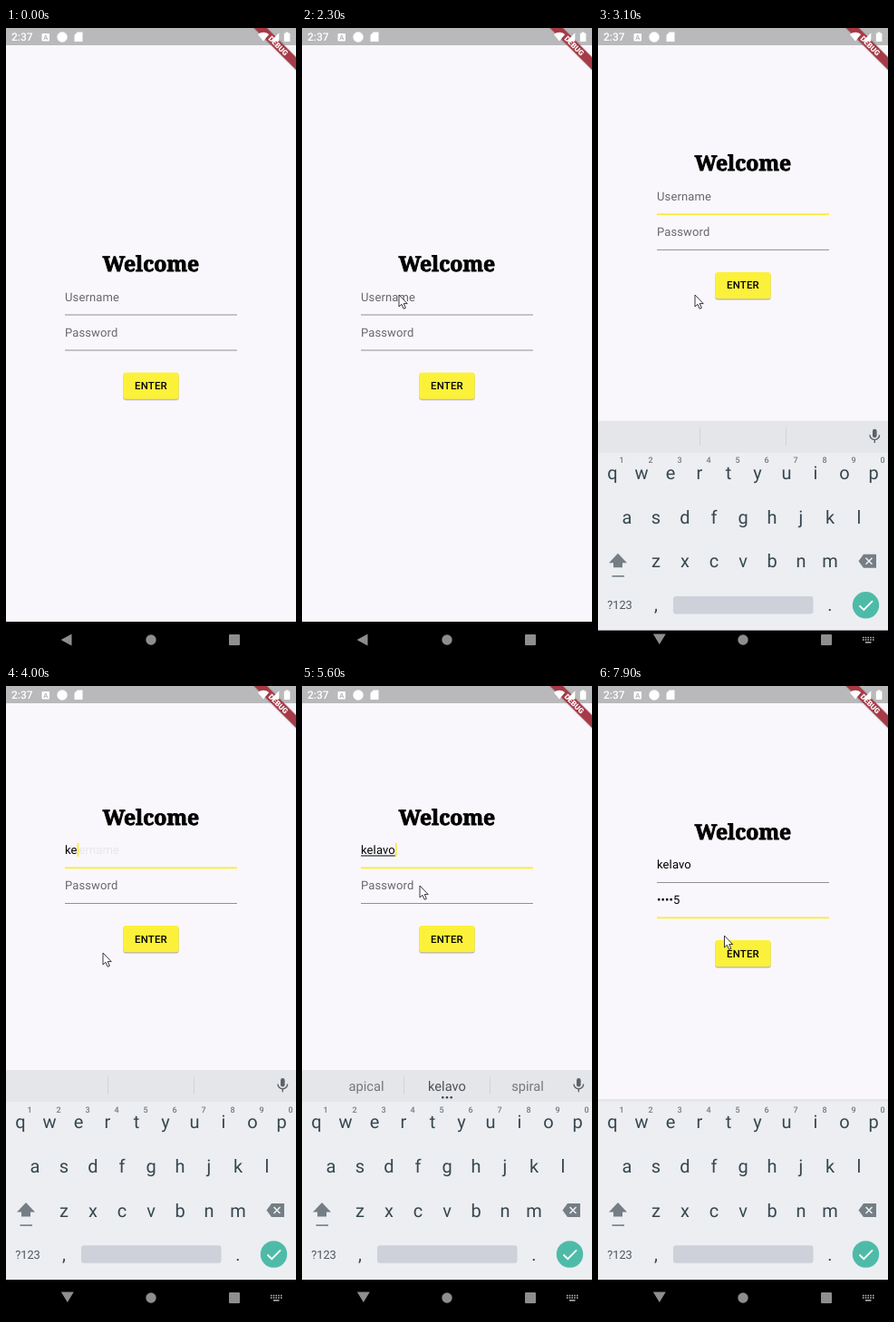
An HTML page that plays this animation: 320 by 694 pixels, repeating every 8 s.

```html
<!DOCTYPE html>
<html lang="en">
<head>
<meta charset="utf-8">
<title>Welcome form</title>
<style>
html, body { margin: 0; width: 100%; height: 100%; overflow: hidden; background: #f9f7fb; }
svg { display: block; width: 320px; height: 694px; font-family: Roboto, sans-serif; }
text { text-rendering: geometricPrecision; white-space: pre; }
.mid { text-anchor: middle; }
.field { font-size: 13px; letter-spacing: .12px; }
.hint { fill: #69676b; }
.key { font-size: 20px; fill: #37474f; }
.digit { font-size: 9px; font-weight: 500; fill: #74797e; }
.word { font-size: 14.7px; fill: #74777b; }
</style>
</head>
<body>
<svg viewBox="0 0 320 694">
  <rect width="320" height="694" fill="#f9f7fb"/>

  <g id="form">
    <text class="mid" x="160" y="268" font-family="Noto Serif, serif" font-weight="900" font-size="23"
      stroke="#000" stroke-width=".9" stroke-linejoin="round">Welcome</text>
    <text id="userHint" class="field hint" x="65" y="300.5">Username</text>
    <text id="user" class="field" x="65" y="300.5"></text>
    <rect id="compose" x="65" y="302" height="1"/>
    <rect id="userLine" x="65" width="190"/>
    <text id="passHint" class="field hint" x="65" y="339.5">Password</text>
    <text id="pass" class="field" x="65" y="339.5"></text>
    <rect id="passLine" x="65" width="190"/>
    <rect id="caret" width="1.7" height="15" fill="#f8ed32"/>
    <rect x="129" y="380.5" width="62" height="30" rx="3.5" fill="#000" opacity=".1"/>
    <rect x="129.5" y="380.5" width="61" height="29.3" rx="3" fill="#000" opacity=".2"/>
    <rect x="129.3" y="379.5" width="61.4" height="29.3" rx="3" fill="#fcf13a"/>
    <text class="mid" x="160" y="398" font-size="11.4" font-weight="500" letter-spacing=".2">ENTER</text>
  </g>

  <rect width="320" height="19" fill="#b9b8ba"/>
  <g transform="translate(320) rotate(45)">
    <rect x="-50" y="22" width="100" height="11.6" fill="#000" opacity=".15"/>
    <rect x="-50" y="22.8" width="100" height="9.8" fill="#a63b47"/>
    <text class="mid" y="30.7" font-size="8.3" font-weight="900" fill="#fff">DEBUG</text>
  </g>
  <g fill="#fff">
    <text x="6" y="14.2" font-size="12" font-weight="500">2:37</text>
    <rect x="39.5" y="6" width="8.5" height="8.5" rx="1"/>
    <text class="mid" x="43.75" y="13" font-size="7.5" font-weight="700" style="fill:#b9b8ba">A</text>
    <circle cx="62" cy="10" r="5.7"/>
    <path d="M78.8 4.5H84.5V15H75.5V7.8Z"/>
    <path d="M277.8 7Q284 2.6 290.2 7L284 14.6Z"/>
    <path d="M292 14.7H301.3V5.2Z"/>
    <path d="M308.6 4.5H311.6V5.7H313.4V15H306.8V5.7H308.6Z"/>
  </g>

  <rect y="654" width="320" height="40"/>
  <g id="keyboard">
    <rect id="panel" width="320" fill="#eceef2"/>
    <g id="strip">
      <rect y="423" width="320" height="34" fill="#e4e6ea"/>
      <path d="M112.5 430V450M207.5 430V450" stroke="#d1d4d8"/>
      <text id="left" class="word mid" x="71" y="445.5">apical</text>
      <text id="middle" class="word mid" x="160" y="445.5" style="fill:#4d5256"></text>
      <text id="right" class="word mid" x="249" y="445.5">spiral</text>
      <g id="dots" fill="#37474f">
        <circle cx="155.3" cy="453.3" r="1.3"/><circle cx="160" cy="453.3" r="1.3"/><circle cx="164.7" cy="453.3" r="1.3"/>
      </g>
      <rect x="303" y="432" width="4.6" height="9.5" rx="2.3" fill="#5a6268"/>
      <path d="M300 438.5a5.3 5.3 0 0 0 10.6 0M305.3 444V447.3" fill="none" stroke="#5a6268" stroke-width="1.4"/>
    </g>
    <rect id="edge" y="455" width="320" height="3" fill="#e4e6ea"/>
    <g id="keys"></g>
    <path d="M22 569L32 579.5H27V584.5H17V579.5H12Z" fill="#747e84"/>
    <rect x="15.5" y="593.3" width="13.5" height="1.6" fill="#747e84"/>
    <path d="M293 570H307V585H293L287.5 577.5Z" fill="#747e84"/>
    <path d="M295.5 574L302.5 581M302.5 574L295.5 581" stroke="#eceef2" stroke-width="1.6"/>
    <text class="mid" x="24" y="630.5" font-size="12.8" fill="#4d565c">?123</text>
    <rect x="83" y="616.3" width="154.5" height="19.5" rx="3" fill="#ced1d9"/>
    <circle cx="295.5" cy="626" r="14.7" fill="#4ebba8"/>
    <path d="M288.5 626.5L293.3 631.2L303 621.4" fill="none" stroke="#fff" stroke-width="1.8"/>
    <rect y="654" width="320" height="60"/>
  </g>

  <g fill="#8e8e8e">
    <path id="back" d="M60.5 674L72.5 667.5V680.5Z"/>
    <g id="kbNav">
      <path d="M60.8 667.5H74.8L67.8 679Z"/>
      <path d="M292 671.5H304.5M292 674H304.5" stroke="#c4c4c4" stroke-width="1.4" stroke-dasharray="1.5 1.25"/>
      <path d="M295 676.8H301.5" stroke="#c4c4c4" stroke-width="1.4"/>
    </g>
    <circle cx="160" cy="674" r="5.7"/>
    <rect x="246" y="668" width="12" height="12" rx="1"/>
  </g>

  <path id="pointer" d="M0 0V13L3 10.3L5.2 15.3L7.4 14.3L5.2 9.6H9.2Z" fill="#fff" stroke="#222" stroke-width=".9"/>
</svg>

<script>
const $ = id => document.getElementById(id);
const LOOP = 8000, TAP_USER = 2850, KB_IN = 2980, TAP_PASS = 5800;
const NAME = 'kelavo', PIN = '12345';
const nameTimes = [3850, 3980, 4300, 4600, 4900, 5150];
const pinTimes = [6500, 6700, 6900, 7150, 7370];
// time, x, y
const path = [[1300, 77, 418], [1800, 107, 294], [5200, 107, 294], [5520, 130, 220],
  [7420, 130, 220], [7800, 139.5, 275]];

const show = (id, on) => $(id).setAttribute('visibility', on ? 'visible' : 'hidden');
const set = (id, attrs) => { for (const k in attrs) $(id).setAttribute(k, attrs[k]); };
const clamp = v => Math.min(1, Math.max(0, v));
const typed = (times, t) => times.filter(s => s <= t).length;

function addText(cls, x, y, s) {
  const el = document.createElementNS('http://www.w3.org/2000/svg', 'text');
  el.setAttribute('class', cls + ' mid');
  el.setAttribute('x', x);
  el.setAttribute('y', y);
  el.textContent = s;
  $('keys').append(el);
}
[['qwertyuiop', 16, 487], ['asdfghjkl', 32, 536], ['zxcvbnm', 64, 584.5]].forEach(([row, x, y]) =>
  [...row].forEach((c, i) => addText('key', x + 32 * i, y, c)));
[...'1234567890'].forEach((c, i) => addText('digit', 26 + 32 * i, 469.5, c));
addText('key', 64, 632.5, ',');
addText('key', 256, 632.5, '.');

function pointerAt(t) {
  let i = path.length - 1;
  while (i > 0 && path[i][0] > t) i--;
  const a = path[i], b = path[i + 1] || a;
  const p = clamp((t - a[0]) / (b[0] - a[0] || 1)), e = p * p * (3 - 2 * p);
  return [a[1] + (b[1] - a[1]) * e, a[2] + (b[2] - a[2]) * e];
}

function underline(id, y, focused) {
  set(id, focused ? { y: y - 1, height: 1.7, fill: '#f8ed32' } : { y: y - .5, height: 1, fill: '#929094' });
}

function draw(t) {
  const open = t >= KB_IN, onUser = t >= TAP_USER && t < TAP_PASS, onPass = t >= TAP_PASS;
  const n = typed(nameTimes, t), m = typed(pinTimes, t);

  // The form stays centred above the keyboard, which slides up while opening.
  const slide = 50 * (1 - clamp((t - KB_IN) / 217)) ** 2;
  const top = (onPass ? 455 : 423) + slide;
  set('form', { transform: `translate(0 ${open ? (top - 654) / 2 : 0})` });
  set('keyboard', { transform: `translate(0 ${slide})` });
  set('panel', { y: top - slide, height: 654 - top + slide });
  $('keyboard').style.display = $('kbNav').style.display = open ? '' : 'none';
  $('back').style.display = open ? 'none' : '';
  $('strip').style.display = onPass ? 'none' : '';

  $('user').textContent = NAME.slice(0, n);
  $('pass').textContent = m ? '•'.repeat(m - 1) + PIN[m - 1] : '';
  set('userHint', { opacity: 1 - clamp((t - nameTimes[0]) / 170) });
  set('passHint', { opacity: 1 - clamp((t - pinTimes[0]) / 170) });
  underline('userLine', 316, onUser);
  underline('passLine', 355, onPass);

  const suggest = onUser && n > 2;
  $('middle').textContent = NAME.slice(0, n);
  ['left', 'middle', 'right', 'dots'].forEach(id => { $(id).style.display = suggest ? '' : 'none'; });
  show('compose', suggest);
  set('compose', { width: $('user').getComputedTextLength() });

  // The caret blinks every half second, restarting on each key press.
  const since = onPass ? (m ? pinTimes[m - 1] : TAP_PASS) : n ? nameTimes[n - 1] : 3300;
  const lit = t >= since && Math.floor((t - since) / 500) % 2 === 0;
  show('caret', lit && (onUser || onPass));
  set('caret', { x: 65 + $(onPass ? 'pass' : 'user').getComputedTextLength(), y: onPass ? 327.5 : 288.5 });

  show('pointer', t >= path[0][0]);
  set('pointer', { transform: `translate(${pointerAt(t)})` });
}

const start = performance.now();
function frame() {
  draw((performance.now() - start) % LOOP);
  requestAnimationFrame(frame);
}
frame();
</script>
</body>
</html>
```
